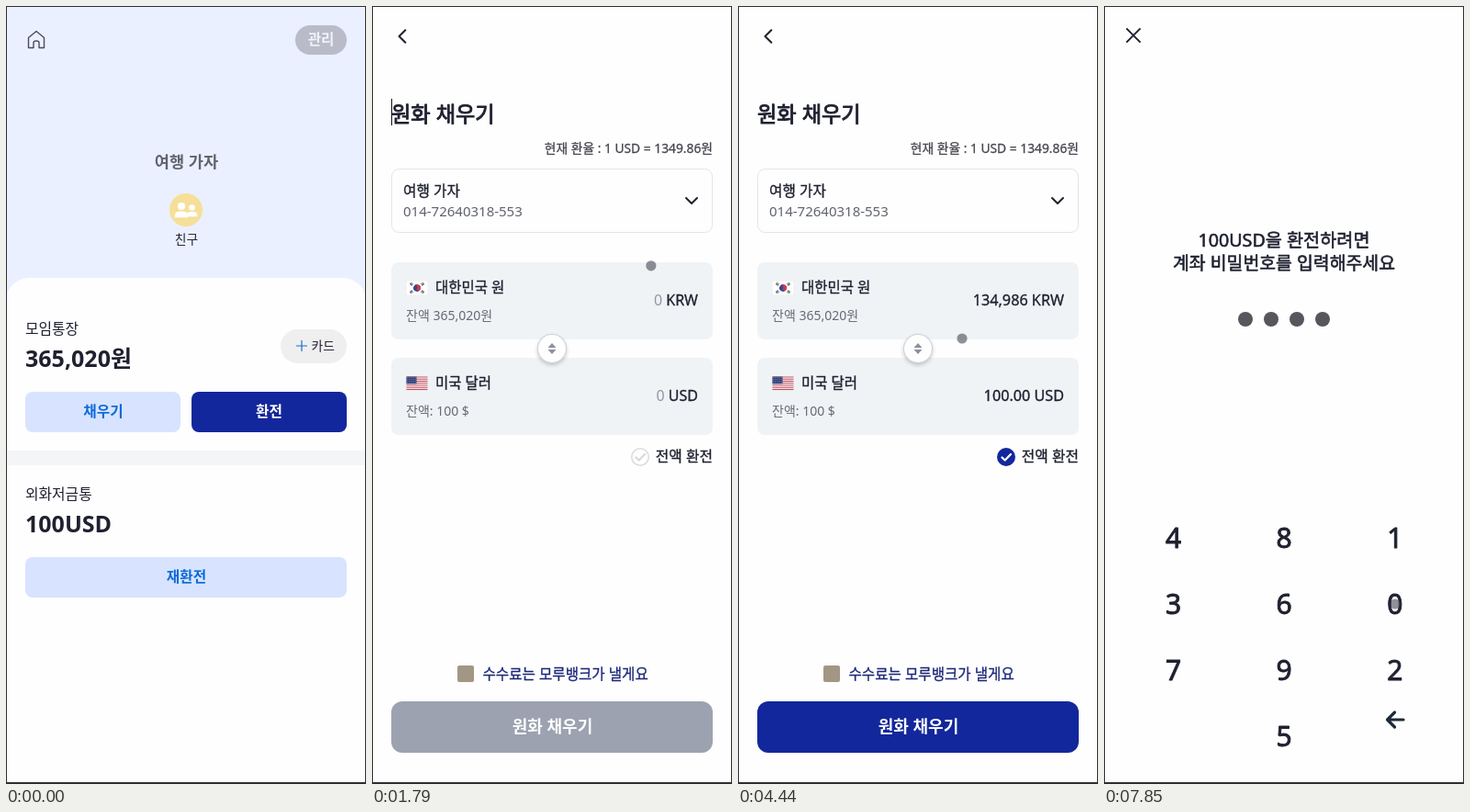
Animation, 392 px wide and 847 px high, one loop 8000 ms. Source, as an HTML page with a canvas:

```html
<!DOCTYPE html>
<html lang="ko">
<head>
<meta charset="utf-8">
<title>환전</title>
<style>
html, body { margin: 0; width: 100%; height: 100%; overflow: hidden; background: #fefefe; }
canvas { display: block; width: 392px; height: 847px; }
</style>
</head>
<body>
<canvas id="stage"></canvas>
<script>
const W = 392, H = 847, LOOP = 8000;
const FONT = '"Noto Sans", "Noto Sans CJK KR", sans-serif';
const NAVY = '#13279c', INK = '#1f2130', PAPER = '#fefefe';
const canvas = document.getElementById('stage');
const ctx = canvas.getContext('2d');
const dpr = window.devicePixelRatio || 1;
canvas.width = W * dpr;
canvas.height = H * dpr;

// Moments when something switches
const LOADING = 620, FORM = 970, FOCUS = 3360, CHECKED = 4060, PIN = 5450;
const PRESSES = [6800, 7090, 7380, 7650];
const CLICKS = [500, 3130, 3960, 5250, ...PRESSES];
const CARETS = [[1500, 2060], [2530, 3010], [PIN, 5960], [6480, 7000]];

// Pointer: time, x, y
const PATH = [
  [130, 250, 800], [480, 293, 634], [1220, 293, 634], [1990, 306, 213],
  [2330, 307, 213], [3010, 287, 420], [3560, 287, 420], [3930, 291, 491],
  [4060, 291, 491], [4260, 312, 462], [4440, 244, 362], [4650, 198, 500],
  [5050, 221, 804], [5660, 221, 804], [6420, 284, 690], [6630, 303, 643],
  [6740, 317, 651]
];

// Weights between regular and bold are regular glyphs with a thin outline
function text(str, x, y, size, weight = 400, color = INK, align = 'left') {
  ctx.font = `${weight < 700 ? 400 : 700} ${size}px ${FONT}`;
  ctx.textAlign = align;
  ctx.fillStyle = color;
  ctx.fillText(str, x, y);
  if (weight === 400 || weight === 700) return;
  ctx.strokeStyle = color;
  ctx.lineJoin = 'round';
  ctx.lineWidth = size * (weight - 400) * 0.0002;
  ctx.strokeText(str, x, y);
}

function box(x, y, w, h, r, fill) {
  ctx.beginPath();
  ctx.roundRect(x, y, w, h, r);
  ctx.fillStyle = fill;
  ctx.fill();
}

function dot(x, y, r, fill) {
  ctx.beginPath();
  ctx.arc(x, y, r, 0, Math.PI * 2);
  ctx.fillStyle = fill;
  ctx.fill();
}

function line(d, color, width, cap = 'round') {
  ctx.strokeStyle = color;
  ctx.lineWidth = width;
  ctx.lineCap = cap;
  ctx.lineJoin = cap === 'round' ? 'round' : 'miter';
  ctx.stroke(new Path2D(d));
}

function shape(d, fill) {
  ctx.fillStyle = fill;
  ctx.fill(new Path2D(d));
}

function person(x, y, s) {
  dot(x, y, 4 * s, '#fff');
  shape(`M${x - 7 * s} ${y + 12 * s}v${-2.5 * s}q0 ${-4 * s} ${7 * s} ${-4 * s}t${7 * s} ${4 * s}v${2.5 * s}z`, '#fff');
}

function account() {
  ctx.fillStyle = '#eaf0ff';
  ctx.fillRect(0, 0, W, 330);
  box(0, 296, W, 560, 25, PAPER);

  line('M24.5 34.5L33 27.5L41.5 34.5V45.5H36V40Q36 38 33 38T30 40V45.5H24.5Z', '#4c4b5c', 1.4);
  box(315, 21, 56, 32, 16, '#b9bcc8');
  text('관리', 343, 42, 15.6, 700, '#f1f3fb', 'center');

  text('여행 가자', 196.5, 175.5, 17.6, 700, '#62636e', 'center');
  dot(196, 222, 18, '#f6df98');
  person(202.5, 219.5, 0.82);
  ctx.save();
  ctx.beginPath();
  ctx.rect(183, 212, 15.8, 20);
  ctx.clip();
  person(191, 218, 1.02);
  ctx.restore();
  text('친구', 196.5, 259, 13.8, 400, INK, 'center');

  text('모임통장', 21, 357, 15.8);
  text('365,020원', 21, 393, 25, 700);
  box(299, 352, 72, 37, 18.5, '#efefef');
  line('M316 370H328M322 364V376', '#1672d4', 1.2, 'butt');
  text('카드', 332.5, 375, 13.8);

  box(21, 420, 169, 44, 8, '#d8e3ff');
  text('채우기', 106, 447, 15.7, 700, '#0a6ad8', 'center');
  box(202, 420, 169, 44, 8, NAVY);
  text('환전', 286.5, 447, 15.7, 700, '#fff', 'center');
  ctx.fillStyle = '#f4f5f7';
  ctx.fillRect(0, 484, W, 16);

  text('외화저금통', 21, 537, 15.8);
  text('100USD', 21, 573, 25, 700);
  box(21, 600, 350, 44, 8, '#d8e3ff');
  text('재환전', 196.5, 627, 15.7, 700, '#0a6ad8', 'center');
}

function loading(t) {
  for (let i = 0; i < 4; i++) {
    const k = Math.max(0, Math.cos((t - 900) / 560 * Math.PI * 2 - i * Math.PI / 2));
    const mix = (a, b) => Math.round(a + (b - a) * k);
    dot(160 + i * 24.3, 422.5 - k, 6.1 + 0.5 * k, `rgb(${mix(195, 169)},${mix(200, 170)},${mix(229, 202)})`);
  }
}

function flagKr() {
  box(37, 299, 24, 16, 1, '#e9e9ec');
  box(37.5, 299.5, 23, 15, 1, '#fff');
  ctx.save();
  ctx.translate(49, 307);
  ctx.rotate(0.55);
  dot(0, 0, 3.9, '#2b4a9c');
  shape('M-3.9 0A3.9 3.9 0 0 1 3.9 0A1.95 1.95 0 0 1 0 0A1.95 1.95 0 0 0 -3.9 0Z', '#d23a48');
  ctx.restore();
  for (const sx of [-1, 1]) for (const sy of [-1, 1]) {
    ctx.save();
    ctx.translate(49 + sx * 6.2, 307 + sy * 4.2);
    ctx.rotate(-sx * sy * 0.98);
    ctx.fillStyle = '#333';
    for (let i = -1; i < 2; i++) ctx.fillRect(-1.4, i * 1.1 - 0.35, 2.8, 0.7);
    ctx.restore();
  }
}

function flagUs() {
  for (let i = 0; i < 13; i++) {
    ctx.fillStyle = i % 2 ? '#f4eeee' : '#c24a58';
    ctx.fillRect(37.5, 403.5 + i * 1.12, 23, 1.12);
  }
  ctx.fillStyle = '#37437c';
  ctx.fillRect(37.5, 403.5, 11, 7.9);
  for (let r = 0; r < 4; r++)
    for (let c = 0; c < 5; c++) dot(38.8 + c * 2.1, 404.5 + r * 1.95, 0.4, '#c5cae0');
}

function amount(num, unit, y, done) {
  const size = done ? 16.2 : 16;
  text(unit, 355, y, size, 500, INK, 'right');
  const w = ctx.measureText(' ' + unit).width;
  text(num, 355 - w, y, size, done ? 500 : 400, done ? INK : '#92969f', 'right');
}

function form(t) {
  const done = t >= CHECKED;
  line('M36.3 26.3L29.5 33L36.3 39.7', '#20222e', 2.1);
  text('원화 채우기', 21, 126, 23.2, 600);
  text('현재 환율 : 1 USD = 1349.86원', 371, 160, 13.8, 500, '#45464f', 'right');

  ctx.beginPath();
  ctx.roundRect(21.5, 177.5, 349, 69, 8);
  ctx.strokeStyle = '#e2e4e8';
  ctx.lineWidth = 1;
  ctx.stroke();
  text('여행 가자', 34, 207, 15.7, 500);
  text('014-72640318-553', 34, 229, 15, 400, '#5f636d');
  line('M342 209L348 215L354 209', '#20222e', 2);

  box(21, 279, 350, 84, 8, '#f0f3f6');
  flagKr();
  text('대한민국 원', 69, 312, 15.5, 500);
  text('잔액 365,020원', 37, 342, 14, 400, '#666a74');
  amount(done ? '134,986' : '0', 'KRW', 326, done);

  box(21, 383, 350, 84, 8, '#f0f3f6');
  flagUs();
  text('미국 달러', 69, 416, 15.5, 500);
  text('잔액: 100 $', 37, 446, 14, 400, '#666a74');
  amount(done ? '100.00' : '0', 'USD', 430, done);
  if (t >= FOCUS && t < FOCUS + 530) {
    ctx.fillStyle = INK;
    ctx.fillRect(318, 415, 1, 21);
  }

  ctx.save();
  ctx.shadowColor = 'rgba(0,0,0,.2)';
  ctx.shadowBlur = 4 * dpr;
  ctx.shadowOffsetY = 2 * dpr;
  dot(196, 373, 16, '#cfd2d6');
  ctx.restore();
  dot(196, 373, 15, PAPER);
  shape('M191.5 372L196 367L200.5 372ZM191.5 374L196 379L200.5 374Z', '#8b929d');

  dot(292, 491, 10, done ? NAVY : '#d9dadc');
  if (!done) dot(292, 491, 8.5, PAPER);
  line('M287.5 491.5L290.7 494.5L297 488', done ? '#fff' : '#d9dadc', 2.3);
  text('전액 환전', 371, 496, 15.8, 500, INK, 'right');

  box(93, 718, 18, 18, 2, '#a39684');
  text('수수료는 모루뱅크가 낼게요', 120.5, 733, 15.6, 500, '#1b2778');
  box(21, 757, 350, 56, 12, done ? NAVY : '#9ca2af');
  text('원화 채우기', 196.5, 791, 18, 700, '#fff', 'center');
}

function pin(t) {
  line('M24.4 24.4L39.6 39.6M39.6 24.4L24.4 39.6', '#20222e', 2, 'butt');
  text('100USD을 환전하려면', 196, 262, 19.7, 550, INK, 'center');
  text('계좌 비밀번호를 입력해주세요', 196, 287, 19.4, 550, INK, 'center');
  PRESSES.forEach((p, i) => dot(154 + i * 28, 341, 8, t >= p ? '#56565d' : '#d8d8d8'));
  [...'481360792 5'].forEach((key, i) => {
    if (key === ' ') return;
    text(key, 75.5 + (i % 3) * 120.7, 590 + Math.floor(i / 3) * 72, 30, 550, INK, 'center');
  });
  line('M326 777H309M316.5 769L308.5 777L316.5 785', '#1d2a3a', 3.2);
}

function pointer(t) {
  if (t < PATH[0][0]) return;
  let i = PATH.length - 1;
  while (PATH[i][0] > t) i--;
  const a = PATH[i], b = PATH[i + 1] || a;
  const u = b === a ? 0 : (t - a[0]) / (b[0] - a[0]);
  const k = u * u * (3 - 2 * u);
  const x = a[1] + (b[1] - a[1]) * k, y = a[2] + (b[2] - a[2]) * k;
  for (const c of CLICKS) {
    const p = (t - c) / 190;
    if (p >= 0 && p < 1) dot(x, y, 6 + 9 * Math.min(1, p * 2), `rgba(80,82,95,${0.28 * (1 - p)})`);
  }
  dot(x, y, 5.6, 'rgba(70,72,84,.6)');
}

function draw(t) {
  ctx.setTransform(dpr, 0, 0, dpr, 0, 0);
  ctx.fillStyle = PAPER;
  ctx.fillRect(0, 0, W, H);
  if (t < LOADING) account();
  else if (t < FORM) loading(t);
  else if (t < PIN) form(t);
  else pin(t);

  if (CARETS.some(([on, off]) => t >= on && t < off)) {
    ctx.fillStyle = '#111';
    if (t < PIN) ctx.fillRect(21, 101, 1, 29);
    else ctx.fillRect(102, 242, 1, 26);
  }
  pointer(t);

  ctx.fillStyle = '#2f2f31';
  ctx.fillRect(0, 0, W, 1);
  ctx.fillRect(0, 0, 1, H);
  ctx.fillRect(W - 1, 0, 1, H);
  ctx.fillRect(0, H - 2, W, 2);
}

const start = performance.now();
function tick() {
  draw((performance.now() - start) % LOOP);
  requestAnimationFrame(tick);
}
draw(0);
requestAnimationFrame(tick);
</script>
</body>
</html>
```
